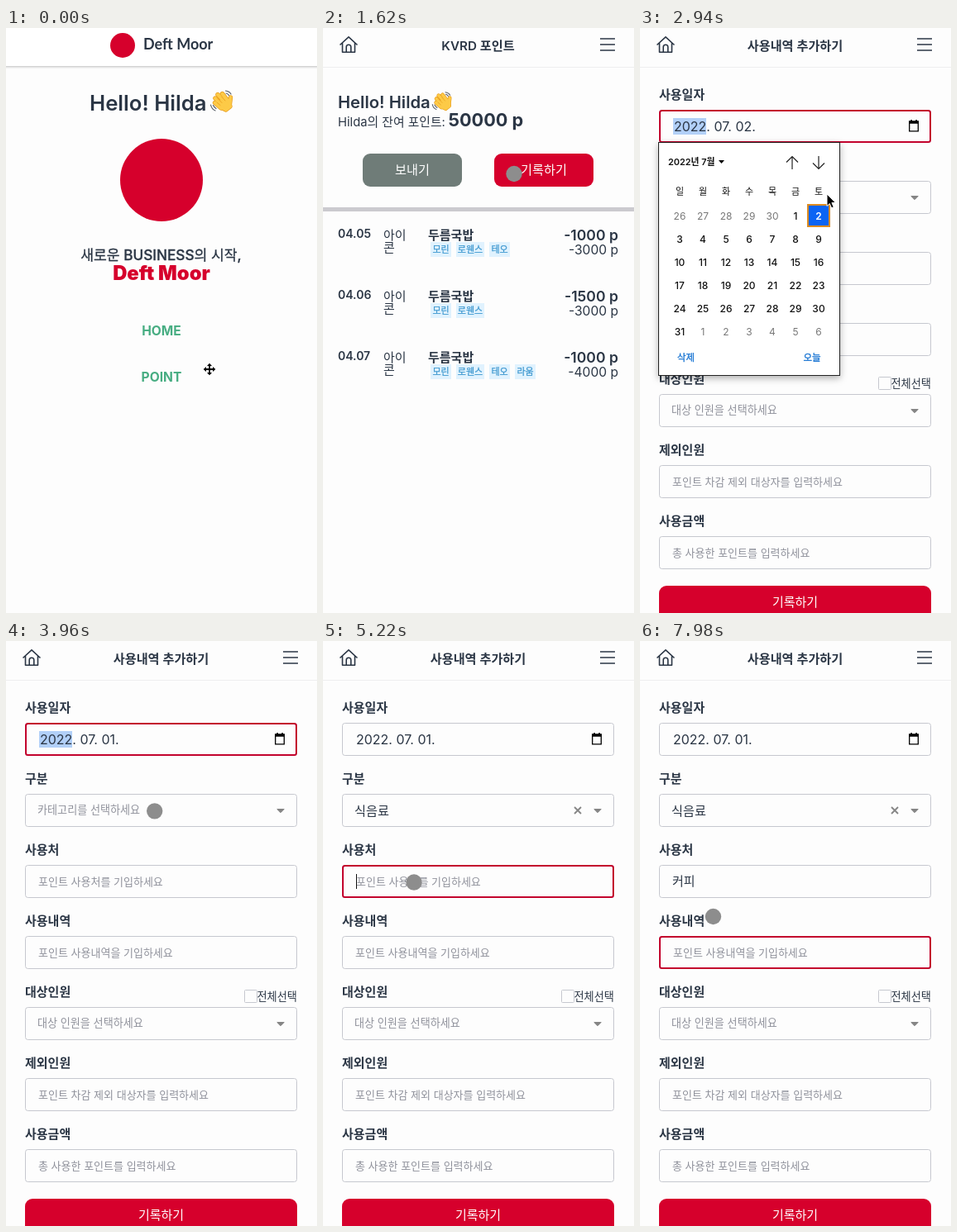
Write an HTML page that moves like this. It is 376 by 708 pixels and loops after 8 s.

```html
<!DOCTYPE html>
<html lang="ko">
<head>
<meta charset="utf-8">
<title>Point app demo</title>
<style>
html, body { margin: 0; width: 100%; height: 100%; overflow: hidden; background: #fdfdfd; }
svg { display: block; width: 376px; height: 708px; }
text { font-family: Inter, 'Noto Sans CJK KR', 'Noto Sans CJK', sans-serif; fill: #2b3645; white-space: pre; }
.mid { text-anchor: middle; }
.end { text-anchor: end; }
.semi { font-weight: 600; }
.bold { font-weight: 700; }
.medium { font-weight: 500; }
.lead { stroke: #2b3645; stroke-width: .3; }
.brand { font-family: Lato, sans-serif; font-weight: 700; }
.black { font-weight: 900; }
.red { fill: #d6002c; }
.green { fill: #47ad82; }
.white { fill: #fff; }
.tag { fill: #3d97cf; stroke: #3d97cf; stroke-width: .25; }
.hint { fill: #8f919b; }
.ink { fill: #111; }
.faded { fill: #777; }
.blue { fill: #1673d2; stroke: #1673d2; stroke-width: .3; }
.line { fill: none; stroke: #2b3645; stroke-width: 1.6; stroke-linejoin: round; }
.box { fill: #fdfdfd; stroke: #c6c8cf; }
.ring { fill: none; stroke: #c3032d; stroke-width: 2; display: none; }
.focus .ring { display: inline; }
.focus .val { transform: translateX(1px); }
.arrow { fill: #858585; stroke: #858585; stroke-linejoin: round; }
</style>
</head>
<body>
<svg id="stage" viewBox="0 0 376 708">
  <defs>
    <filter id="soft" x="-20%" y="-20%" width="140%" height="150%">
      <feDropShadow dx="0" dy="1" stdDeviation="1.4" flood-opacity=".26"/>
    </filter>
    <filter id="lift" x="-20%" y="-20%" width="140%" height="140%">
      <feDropShadow dx="0" dy="3" stdDeviation="4" flood-opacity=".3"/>
    </filter>
    <g id="hand" fill="none" stroke-linecap="round" stroke-linejoin="round">
      <g stroke="#e79b1b" stroke-width="5.4">
        <path d="M7 11L16 20M10 6.5L19 16M15.5 5.5L22 14M6.5 16.5L14 23M25.5 10L24.5 18"/>
        <path d="M14 15L23 14L25 21L20 25L14 22Z" fill="#e79b1b"/>
      </g>
      <g stroke="#fdca47" stroke-width="4">
        <path d="M7 11L16 20M10 6.5L19 16M15.5 5.5L22 14M6.5 16.5L14 23M25.5 10L24.5 18"/>
        <path d="M14 15L23 14L25 21L20 25L14 22Z" fill="#fdca47"/>
      </g>
      <path d="M10 11.5L15 16.5M14.5 9L19 14M9.5 16.5L13 19.5" stroke="#e79b1b" stroke-width=".8"/>
      <path d="M1.5 19Q2.5 24 7 26M4.5 19.5Q5.5 22 8 23.5M19.5 2Q24 2.5 26 6M20 5Q22.5 5.5 23.5 7.5" stroke="#596069" stroke-width="1.2"/>
    </g>
  </defs>
</svg>
<script>
const LOOP = 8000, STEP = 60;
const AT = { point: 600, form: 1800, calOpen: 2640, calShut: 3300, menuOpen: 4080, pick: 4860, place: 5220, detail: 7440 };

const text = (x, y, size, str, cls = '') => `<text x="${x}" y="${y}" font-size="${size}" class="${cls}">${str}</text>`;
const rect = (x, y, w, h, rest = '') => `<rect x="${x}" y="${y}" width="${w}" height="${h}" ${rest}/>`;
// Pairs of start and end times between which the group is shown
const during = (times, body) => `<g data-on="${times}">${body}</g>`;

const topBar = title => `
  ${rect(0, 47, 376, 1, 'fill="#eeeeef"')}
  <path class="line" d="M20.5 20.5L31 10.8L41.5 20.5M23.5 18V29.2H38.5V18M28.2 29V23Q28.2 20.3 31 20.3Q33.8 20.3 33.8 23V29"/>
  <path class="line" d="M335 13H353M335 20H353M335 27H353"/>
  ${text(187.5, 26.5, 15.2, title, 'semi mid')}`;

function homePage() {
  return rect(-5, -5, 386, 51, 'fill="#fff" filter="url(#soft)"') +
    '<circle class="red" cx="141" cy="21" r="15"/>' +
    text(166, 26, 18, 'Deft Moor', 'brand') +
    text(101, 100, 25.7, 'Hello! Hilda', 'semi') +
    '<use href="#hand" x="246" y="74"/>' +
    '<circle class="red" cx="188" cy="184" r="50"/>' +
    text(187.5, 280.5, 17.2, '새로운 BUSINESS의 시작,', 'medium lead mid') +
    text(188, 305, 23.8, 'Deft Moor', 'black red mid') +
    text(188, 372, 15.6, 'HOME', 'bold green mid') +
    text(188, 428, 15.6, 'POINT', 'bold green mid');
}

function spendRow(i, date, people, cost, left) {
  let x = 130;
  const tags = people.map(name => {
    const w = name.length === 3 ? 34 : 25;
    const tag = rect(x, 259, w, 18, 'fill="#e0f2fe"') + text(x + w / 2, 272, 11, name, 'tag mid');
    x += w + 6;
    return tag;
  }).join('');
  return `<g transform="translate(0 ${i * 74})">` +
    text(18, 254, 14, date, 'semi') + text(73, 255.5, 15, '아이') + text(73, 271, 15, '콘') +
    text(127, 255.5, 15, '두름국밥', 'semi') + tags +
    text(357, 257, 17.6, `-${cost} p`, 'semi end') + text(357, 274, 15.6, `-${left} p`, 'end') + '</g>';
}

function pointPage() {
  return topBar('KVRD 포인트') +
    text(18, 97, 20.3, 'Hello! Hilda', 'semi') +
    '<use href="#hand" transform="translate(131 76) scale(.87)"/>' +
    text(18, 118.5, 14.8, 'Hilda의 잔여 포인트:') +
    text(151.5, 118.5, 21.7, '50000 p', 'bold') +
    rect(48, 152, 120, 40, 'rx="9" fill="#6f7c78"') + text(108, 177, 15.2, '보내기', 'white mid') +
    rect(207, 152, 120, 40, 'rx="9" class="red"') + text(267, 177, 15.2, '기록하기', 'white mid') +
    rect(0, 217, 376, 5, 'fill="#cbcacf"') +
    spendRow(0, '04.05', ['모린', '로웬스', '테오'], 1000, 3000) +
    spendRow(1, '04.06', ['모린', '로웬스'], 1500, 3000) +
    spendRow(2, '04.07', ['모린', '로웬스', '테오', '라움'], 1000, 4000);
}

function field(i, label, value, focus = '', extra = '') {
  const y = 99 + i * 86;
  return text(23, y - 13, 15, label, 'semi') +
    `<g data-focus="${focus}">${rect(23.5, y + .5, 328, 39, 'rx="3" class="box"')}` +
    `${rect(24, y + 1, 327, 38, 'rx="2.5" class="ring"')}<g class="val">${value}</g>${extra}</g>`;
}

const hint = (i, str) => text(39, 123.5 + i * 86, 13, str, 'hint');
const pickHint = (i, str) => text(38, 123 + i * 86, 13.1, str, 'hint');
const down = y => `<path class="arrow" d="M327.8 ${y - 1.5}H336.2L332 ${y + 2.7}Z"/>`;
const caret = (x, y, times) => during(times, rect(x, y, 1, 18, 'fill="#111"'));
const typing = (str, times, tail) => during(times, text(39, 295.5, 15, str) + tail);
const composing = rect(39, 298, 14, 1, 'fill="#111"') + rect(53, 282, 1, 18, 'fill="#111"');

function formPage() {
  const date = during(`${AT.calOpen} ${AT.menuOpen}`, rect(39, 109, 40, 20, 'fill="#b2d0f8"')) +
    during(`0 ${AT.calShut}`, text(40, 124.7, 16, '2022. 07. 02.')) +
    during(`${AT.calShut} ${LOOP}`, text(40, 124.7, 16, '2022. 07. 01.'));
  const dateIcon = '<path d="M325.7 113.2H336.3V124.8H325.7Z" fill="none" stroke="#000" stroke-width="1.3"/>' +
    '<path d="M325 112.5H337V115.8H325ZM327.3 111H328.8V113H327.3ZM333.3 111H334.8V113H333.3Z"/>';
  const kind = during(`0 ${AT.pick}`, pickHint(1, '카테고리를 선택하세요')) +
    during(`${AT.pick} ${LOOP}`, text(38, 210.5, 15.2, '식음료'));
  const kindIcons = during(`0 ${AT.menuOpen} ${AT.pick} ${LOOP}`, down(205)) +
    during(`${AT.menuOpen} ${AT.pick}`, '<path class="arrow" d="M326.8 206.5H335.2L331 202.3Z"/>') +
    during(`${AT.pick} ${LOOP}`, '<path d="M304 201L312 209M312 201L304 209" stroke="#858585" stroke-width="1.8"/>');
  const place = during('0 5940', hint(2, '포인트 사용처를 기입하세요')) +
    typing('ㅋ', '5940 6180', composing) + typing('커', '6180 6600', composing) +
    typing('컾', '6600 6900', composing) +
    typing('커피', `6900 ${AT.detail}`, rect(67, 282, 1, 18, 'fill="#111"')) +
    typing('커피', `${AT.detail} ${LOOP}`, '');

  return topBar('사용내역 추가하기') +
    field(0, '사용일자', date, `${AT.calOpen} ${AT.menuOpen}`, dateIcon) +
    field(1, '구분', kind, `${AT.menuOpen} ${AT.place}`, kindIcons) +
    field(2, '사용처', place, `${AT.place} ${AT.detail}`, caret(40, 282, `${AT.place} 5640`)) +
    field(3, '사용내역', hint(3, '포인트 사용내역을 기입하세요'), `${AT.detail} ${LOOP}`, caret(40, 368, `${AT.detail} 7920`)) +
    field(4, '대상인원', pickHint(4, '대상 인원을 선택하세요'), '', down(463)) +
    field(5, '제외인원', hint(5, '포인트 차감 제외 대상자를 입력하세요')) +
    field(6, '사용금액', hint(6, '총 사용한 포인트를 입력하세요')) +
    rect(288.5, 422.5, 15, 15, 'rx="1" class="box"') + text(352, 434.5, 13.2, '전체선택', 'end') +
    rect(23, 675, 329, 42, 'rx="9" class="red"') + text(187.5, 699.5, 15, '기록하기', 'white mid') +
    during(`${AT.calOpen} ${AT.calShut}`, calendar()) +
    during(`${AT.menuOpen} ${AT.pick}`, menu());
}

function calendar() {
  const col = k => 48 + k * 28;
  let out = rect(22.5, 138.5, 219, 282, 'fill="#fff" stroke="#222" filter="url(#lift)"') +
    text(34, 166, 10.9, '2022년 7월', 'ink semi') +
    '<path d="M95 160H102L98.5 164Z"/>' +
    '<path d="M184 171V155.5M177 162.5L184 155.5L191 162.5M216 155V170.5M209 163.5L216 170.5L223 163.5" fill="none" stroke="#222" stroke-width="1.2"/>' +
    rect(203, 214, 26, 26, 'fill="#0b64f4" stroke="#dc8b21" stroke-width="2"');
  [...'일월화수목금토'].forEach((d, k) => out += text(col(k), 202, 11, d, 'ink mid'));
  for (let k = 0; k < 42; k++) {
    const n = k - 4;
    const day = n < 1 ? n + 30 : n > 31 ? n - 31 : n;
    const cls = n === 2 ? 'white semi' : n === day ? 'ink medium' : 'faded';
    out += text(col(k % 7), 232 + Math.floor(k / 7) * 28, 12, day, cls + ' mid');
  }
  return out + text(55.5, 402.5, 11.5, '삭제', 'blue mid') + text(208, 402.5, 11.5, '오늘', 'blue mid');
}

function menu() {
  return rect(24.5, 223.5, 326, 142, 'rx="2" class="box"') +
    ['식대초과', '식음료', '문화', '물품'].map((s, i) => text(37, 246.5 + i * 35.4, 13.1, s)).join('');
}

const pointer = during('0 120',
    '<path d="M-5 0H5M0 -5V5" stroke="#000" stroke-width="1.8"/>' +
    '<path d="M0 -7.3L3 -4H-3ZM0 7.3L3 4H-3ZM-7.3 0L-4 -3V3ZM7.3 0L4 -3V3Z"/>') +
  during(`120 2880 ${AT.calShut} 5460 7080 ${LOOP}`, '<circle r="9.7" fill="#8d8d8d"/>') +
  during(`2880 ${AT.calShut}`, '<path d="M0 -8V6.5L3.3 3.5L5.6 8.8L8.2 7.7L5.9 2.5H10.4Z" stroke="#fff"/>');

const stage = document.getElementById('stage');
stage.insertAdjacentHTML('beforeend',
  during(`0 ${AT.point}`, homePage()) +
  during(`${AT.point} ${AT.form}`, pointPage()) +
  during(`${AT.form} ${LOOP}`, formPage()) +
  `<g id="pointer">${pointer}</g>`);

// Time, x, y
const path = [
  [0, 246, 413], [60, 246, 413], [420, 196, 424], [600, 192, 422], [960, 137.5, 208.5],
  [1440, 232, 177], [1800, 230, 176], [2160, 134.5, 168.5], [2520, 329, 120], [2640, 330, 119],
  [2940, 226, 209], [3180, 189, 229], [3540, 188, 228], [3900, 180, 206], [4140, 178, 205],
  [4620, 91.5, 277.5], [4860, 84, 278], [5160, 110, 292], [7080, 104, 300],
  [7380, 88, 382], [7740, 86, 388], [7980, 88.5, 333.5], [8000, 88.5, 333.5]
];

function place(t) {
  const i = path.findIndex(p => p[0] > t);
  const [t0, x0, y0] = path[i - 1], [t1, x1, y1] = path[i];
  const p = (t - t0) / (t1 - t0), e = p * p * (3 - 2 * p);
  return `translate(${x0 + (x1 - x0) * e} ${y0 + (y1 - y0) * e})`;
}

const collect = key => [...stage.querySelectorAll(`[data-${key}]`)].map(el => {
  const times = el.dataset[key].split(' ').map(Number);
  return { el, live: t => times.some((from, i) => i % 2 === 0 && t >= from && t < times[i + 1]) };
});
const shown = collect('on'), focused = collect('focus');
const mover = document.getElementById('pointer');

function draw() {
  const t = Math.floor(performance.now() % LOOP / STEP) * STEP;
  shown.forEach(({ el, live }) => el.style.display = live(t) ? '' : 'none');
  focused.forEach(({ el, live }) => el.classList.toggle('focus', live(t)));
  mover.setAttribute('transform', place(t));
  requestAnimationFrame(draw);
}
draw();
</script>
</body>
</html>
```
